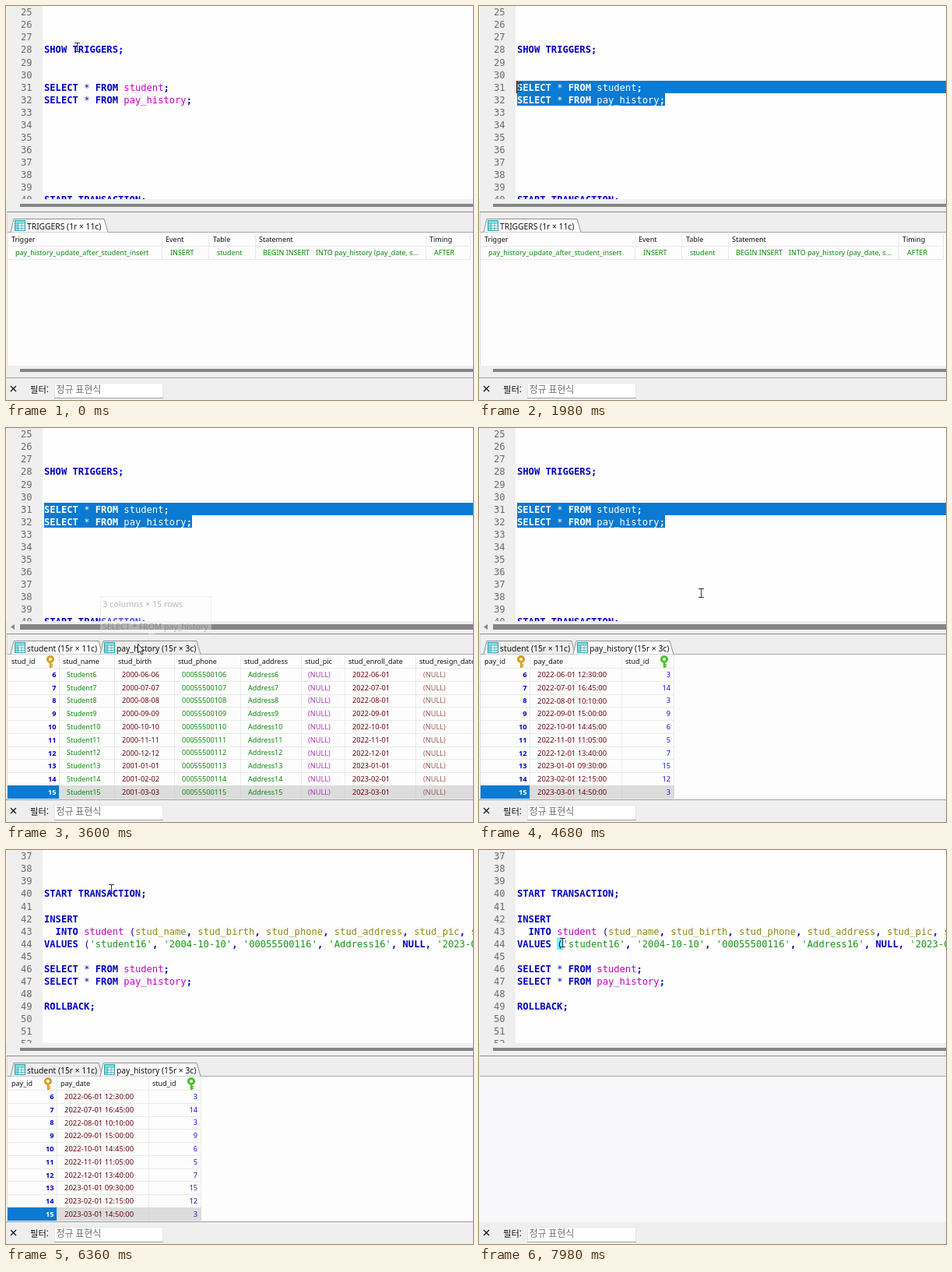
An HTML page with a canvas that plays this animation: 600x506 px, repeating every 8000 ms.

```html
<!DOCTYPE html>
<html lang="ko">
<head>
<meta charset="utf-8">
<style>
  html, body { margin: 0; width: 100%; height: 100%; overflow: hidden; background: #fff; }
  canvas { display: block; }
</style>
</head>
<body>
<canvas id="stage" width="600" height="506"></canvas>
<script>
const ctx = document.getElementById('stage').getContext('2d');
const LOOP = 8000;
const MONO = '"DejaVu Sans Mono", "Noto Sans Mono", monospace';
const SANS = '"Noto Sans", "Open Sans", sans-serif';
const KOREAN = '"Noto Sans CJK KR", "Noto Sans CJK", "Noto Sans", sans-serif';
const CODE_X = 49, CHAR_W = 7.31, CODE_SIZE = 12.14, LINE_H = 16.04, EDITOR_H = 248;
const ROW_H = 16.77, ROW_TOP = 308, VISIBLE_ROWS = 10;
const GREEN = '#0a8a0a', MAROON = '#6c0010', BLUE = '#0000c8', SELECT = '#0a7ad2', GRID = '#eaeaea';

const CODE = {
  28: 'SHOW TRIGGERS;',
  31: 'SELECT * FROM student;',
  32: 'SELECT * FROM pay_history;',
  40: 'START TRANSACTION;',
  42: 'INSERT',
  43: '  INTO student (stud_name, stud_birth, stud_phone, stud_address, stud_pic, stud_enroll_date',
  44: "VALUES ('student16', '2004-10-10', '00055500116', 'Address16', NULL, '2023-04-01'",
  46: 'SELECT * FROM student;',
  47: 'SELECT * FROM pay_history;',
  49: 'ROLLBACK;'
};

// Moments of the interaction, in ms
const AT = {
  dragStart: 1100, dragEnd: 1600, results: 2280, rowsDown: 2520, pickStudent: 3120,
  barHover: 3330, tip: 3530, payTab: 3780, payDown: 3960, pickPay: 4290,
  codeScroll: 5280, barLeave: 5640, deselect: 6030, cleared: 6540, bracket: 7800
};

const POINTER = [
  [0, 91, 53], [200, 91, 53], [900, 243, 121], [1100, 243, 121], [1600, 51, 104],
  [2150, 51, 104], [2550, 50, 419], [2860, 50, 419], [3060, 45, 465], [3200, 45, 465],
  [3500, 169, 277], [3800, 169, 277], [4100, 45, 465], [4310, 45, 465], [4620, 285, 212],
  [5700, 285, 212], [6000, 135, 50], [6700, 135, 50], [7700, 107, 119], [LOOP, 107, 119]
];

const pad = n => String(n).padStart(2, '0');

function studentRow(n) {
  const year = n > 12 ? 2001 : 2000;
  const month = (n - 1) % 12 + 1;
  return [n, 'Student' + n, `${year}-${pad(month)}-${pad(month)}`, '000555001' + pad(n), 'Address' + n,
    '(NULL)', `${2022 + (n > 12)}-${pad(month)}-01`, '(NULL)'];
}

const PAY_TIMES = ('10:00 11:30 09:15 14:20 13:10 12:30 16:45 10:10 15:00 14:45 ' +
  '11:05 13:40 09:30 12:15 14:50').split(' ');
const PAY_STUDENTS = [1, 2, 4, 8, 10, 3, 14, 3, 9, 6, 5, 7, 15, 12, 3];

function payRow(n) {
  const month = (n - 1) % 12 + 1;
  return [n, `${2022 + (n > 12)}-${pad(month)}-01 ${PAY_TIMES[n - 1]}:00`, PAY_STUDENTS[n - 1]];
}

// Column: name, header x, value x, right border, colour, font size, right aligned
const col = (name, head, x, edge, color, size = 9, right = false) => ({ name, head, x, edge, color, size, right });
const TABLES = {
  triggers: {
    cols: [col('Trigger', 7, 12, 200, GREEN), col('Event', 205, 211, 260, GREEN), col('Table', 266, 271, 320, GREEN),
      col('Statement', 325, 330, 539, GREEN), col('Timing', 544, 550, 596, GREEN)],
    width: 597, keys: []
  },
  student: {
    cols: [col('stud_id', 7, 64.5, 68, BLUE, 9.2, true), col('stud_name', 73, 78, 139, GREEN),
      col('stud_birth', 144, 149, 216, MAROON, 9.2), col('stud_phone', 221, 226, 301, GREEN, 9.1),
      col('stud_address', 306, 311, 379, GREEN), col('stud_pic', 384, 388, 435, '#a83cb4', 9.2),
      col('stud_enroll_date', 440, 445, 526, MAROON, 9.2), col('stud_resign_date', 531, 536, 620, '#a05a5a', 9.2)],
    width: 600, keys: [[57, '#d9a02c']], row: studentRow
  },
  pay: {
    cols: [col('pay_id', 7, 61.5, 65, BLUE, 9.2, true), col('pay_date', 70, 75, 183, MAROON, 9.45),
      col('stud_id', 188, 246, 250, '#1414d8', 9.2, true)],
    width: 250, keys: [[54, '#d9a02c'], [238, '#4cc02c']], row: payRow
  }
};

function rect(x, y, w, h, color) {
  ctx.fillStyle = color;
  ctx.fillRect(x, y, w, h);
}

// Text centred on y by its cap height
function text(str, x, y, color, size, { font = SANS, bold = false, align = 'left' } = {}) {
  ctx.font = `${bold ? 'bold ' : ''}${size}px ${font}`;
  ctx.fillStyle = color;
  ctx.textAlign = align;
  ctx.fillText(str, x, y + size * 0.36);
}

function path(points, fill, stroke, close = true) {
  ctx.beginPath();
  points.forEach(([x, y]) => ctx.lineTo(x, y));
  if (close) ctx.closePath();
  if (fill) { ctx.fillStyle = fill; ctx.fill(); }
  if (stroke) { ctx.strokeStyle = stroke; ctx.lineWidth = 1; ctx.stroke(); }
}

function pointerAt(t) {
  const i = POINTER.findIndex(p => p[0] > t);
  const [t0, x0, y0] = POINTER[i - 1], [t1, x1, y1] = POINTER[i];
  const k = (t - t0) / (t1 - t0), e = k * k * (3 - 2 * k);
  return { x: x0 + (x1 - x0) * e, y: y0 + (y1 - y0) * e };
}

// Number of units passed since start, one per step
const steps = (t, start, step, max) => Math.max(0, Math.min(max, Math.floor((t - start) / step) + 1));

function tokenStyle(token, inColumns) {
  if (token[0] === "'") return ['#169616', false];
  if (/^[A-Z]/.test(token)) return [BLUE, true];
  if (/^[a-z]/.test(token)) return [inColumns ? '#8c8c0c' : '#c400c4', false];
  return [BLUE, token === ';' || token === ','];
}

function drawCodeLine(str, y, white) {
  let inColumns = false;
  for (const m of str.matchAll(/'[^']*'|\w+|[^\s\w]/g)) {
    if (m[0] === '(') inColumns = true;
    const [color, bold] = tokenStyle(m[0], inColumns);
    text(m[0], CODE_X + m.index * CHAR_W, y, white ? '#fff' : color, CODE_SIZE, { font: MONO, bold });
  }
}

function selectionStart(t) {
  if (t < AT.dragStart || t >= AT.deselect) return null;
  const p = pointerAt(Math.min(t, AT.dragEnd));
  const line = p.y < 112 ? 31 : 32;
  const c = Math.round((p.x - CODE_X) / CHAR_W);
  return { line, col: Math.max(0, Math.min(CODE[line].length, c)) };
}

function drawEditor(t) {
  const first = 25 + 3 * steps(t, AT.codeScroll, 120, 4);
  const sel = selectionStart(t);
  ctx.save();
  ctx.beginPath();
  ctx.rect(0, 0, 600, EDITOR_H);
  ctx.clip();
  rect(0, 0, 600, EDITOR_H, '#fefefe');
  rect(1, 0, 46, EDITOR_H, '#efefef');
  for (let n = first; n < first + 16; n++) {
    const y = 8 + (n - first) * LINE_H;
    const code = CODE[n] || '';
    text(n, 33.6, y, '#6c6c6c', CODE_SIZE, { font: MONO, align: 'right' });
    if (n === 44 && t >= AT.bracket) rect(100, y - 8, 8.5, 16, '#7cf4f4');
    drawCodeLine(code, y, false);
    if (sel && n >= sel.line && n <= 32) {
      const x = CODE_X + (n === sel.line ? sel.col : 0) * CHAR_W;
      const end = n === 32 ? CODE_X + code.length * CHAR_W : 600;
      ctx.save();
      ctx.beginPath();
      ctx.rect(x, Math.round(y - 8), end - x, 16);
      ctx.clip();
      rect(x, y - 9, end - x, 18, SELECT);
      drawCodeLine(code, y, true);
      ctx.restore();
      const caretOn = t < AT.pickStudent && Math.floor((t - AT.dragEnd) / 530) % 2 === 0;
      if (n === sel.line && caretOn) rect(Math.floor(x) - 1, Math.round(y - 8), 1, 16, '#111');
    }
  }
  ctx.restore();

  rect(0, 248, 600, 16, '#efefef');
  const hover = t >= AT.barHover && t < AT.barLeave;
  if (hover) path([[6, 255.5], [11, 252], [11, 259]], '#858585');
  rect(18, hover ? 252 : 254, 582, hover ? 7 : 4, '#858585');
}

function tableIcon(x, y) {
  rect(x, y, 14, 14, '#2f9fae');
  rect(x + 1, y + 1, 12, 3, '#7fdde0');
  for (let r = 0; r < 3; r++)
    for (let c = 0; c < 3; c++)
      rect(x + 1 + c * 4.2, y + 4.5 + r * 3.1, 3.5, 2.4, c ? '#f2ffff' : '#8fe0e4');
}

function drawTab(x, right, label, active) {
  path([[x, 290.5], [x + 4, 273.5], [right - 5, 273.5], [right, 290.5]], active ? '#fdfdfd' : '#efefef', '#909090', false);
  tableIcon(x + 5, 275);
  text(label, x + 21, 283, '#111', 10.3);
}

function drawKey(x, color) {
  ctx.strokeStyle = color;
  ctx.lineWidth = 3;
  ctx.beginPath();
  ctx.arc(x, 297, 3.6, 0, 7);
  ctx.stroke();
  rect(x - 1.2, 300, 2.6, 8, color);
  rect(x + 1, 303, 2.2, 1.5, color);
  rect(x + 1, 305.5, 2.2, 1.5, color);
}

function drawHeader({ cols, width, keys }) {
  for (const c of cols) {
    text(c.name, c.head, 299.5, '#111', 9);
    rect(c.edge, 292, 1, 16, GRID);
  }
  rect(2, 308, width - 2, 1, GRID);
  keys.forEach(([x, color]) => drawKey(x, color));
}

function drawRows(table, firstRow, picked) {
  const { cols, width, row } = table;
  for (let i = 0; i < VISIBLE_ROWS; i++) {
    const n = firstRow + i, y = ROW_TOP + i * ROW_H;
    const top = Math.round(y), bottom = Math.round(y + ROW_H);
    const isPicked = n === picked;
    if (isPicked) {
      rect(2, top, width - 2, bottom - top, '#dcdcdc');
      rect(2, top, cols[0].edge - 2, bottom - top, SELECT);
    }
    rect(2, bottom, width - 2, 1, GRID);
    row(n).forEach((value, k) => {
      const c = cols[k];
      rect(c.edge, top, 1, bottom - top, isPicked ? '#d4d4d4' : GRID);
      text(value, c.x, y + 8.6, isPicked && !k ? '#fff' : c.color, c.size,
        { bold: k === 0, align: c.right ? 'right' : 'left' });
    });
  }
}

function drawTriggers() {
  const { cols } = TABLES.triggers;
  const values = ['pay_history_update_after_student_insert', 'INSERT', 'student', 'BEGIN INSERT', 'AFTER'];
  values.forEach((v, k) => {
    rect(cols[k].edge, ROW_TOP, 1, 17, GRID);
    text(v, cols[k].x, 317, GREEN, 9);
  });
  text('INTO pay_history (pay_date, s...', 398, 317, GREEN, 9);
  rect(2, 325, 595, 1, GRID);
  rect(0, 462, 600, 15, '#efefef');
  rect(18, 466, 582, 4, '#858585');
}

function drawResults(t) {
  const cleared = t >= AT.cleared;
  rect(0, 264, 600, 27, '#eeeeee');
  rect(1, 264, 599, 1, '#8e8e8e');
  rect(0, 291, 600, 187, cleared ? '#f8f7fa' : '#fdfdfd');
  rect(1, 290, 599, 1, '#a8a8a8');
  if (cleared) return;

  rect(1, 265, 1, 212, '#dcdcdc');
  if (t < AT.results) {
    drawTab(6, 131, 'TRIGGERS (1r × 11c)', true);
    drawHeader(TABLES.triggers);
    drawTriggers();
  } else {
    const onPay = t >= AT.payTab;
    drawTab(6, 124, 'student (15r × 11c)', !onPay);
    drawTab(121, 250, 'pay_history (15r × 3c)', onPay);
    const table = onPay ? TABLES.pay : TABLES.student;
    const scroll = Math.min(5, 3 * steps(t, onPay ? AT.payDown : AT.rowsDown, 120, 2));
    const picked = t >= (onPay ? AT.pickPay : AT.pickStudent) ? 15 : 0;
    drawHeader(table);
    drawRows(table, 1 + scroll, picked);
  }
  rect(0, 477, 600, 1, '#a0a0a0');
}

function drawFilter() {
  rect(0, 478, 600, 28, '#efefef');
  ctx.strokeStyle = '#111';
  ctx.lineWidth = 1.2;
  ctx.beginPath();
  ctx.moveTo(6, 488); ctx.lineTo(13, 495);
  ctx.moveTo(13, 488); ctx.lineTo(6, 495);
  ctx.stroke();
  text('필터:', 31, 493, '#111', 11.3, { font: KOREAN });
  rect(62, 484, 140, 20, '#e6e6e6');
  rect(63, 485, 138, 18, '#fff');
  rect(62, 503, 140, 1, '#a0a0a0');
  text('정규 표현식', 64.5, 493, '#707070', 12, { font: KOREAN });
}

function drawTip(t) {
  if (t < AT.tip || t >= AT.payTab) return;
  ctx.globalAlpha = Math.min(1, (t - AT.tip) / 200);
  path([[121.5, 216.5], [263.5, 216.5], [263.5, 262.5], [193, 262.5], [183, 273], [183, 262.5], [121.5, 262.5]],
    '#f8f8f8', '#d4d4d4');
  text('3 columns × 15 rows', 124, 226, '#444', 10.8);
  text('SELECT * FROM pay_history', 124, 255, '#444', 10.5);
  ctx.globalAlpha = 1;
}

function drawPointer(t) {
  const { x, y } = pointerAt(t);
  ctx.save();
  ctx.translate(Math.round(x), Math.round(y));
  if (y < EDITOR_H && x > 48) {
    rect(0, -6, 1, 12, '#333');
    for (const side of [-6, 5]) {
      rect(-3, side, 3, 1, '#333');
      rect(1, side, 3, 1, '#333');
    }
  } else {
    path([[0.5, 0.5], [0.5, 12], [3, 9.5], [5, 14], [7, 13], [5, 9], [8.5, 9]], '#fff', '#222');
  }
  ctx.restore();
}

function frame() {
  const t = performance.now() % LOOP;
  drawEditor(t);
  drawResults(t);
  drawFilter();
  drawTip(t);
  drawPointer(t);
  requestAnimationFrame(frame);
}
frame();
</script>
</body>
</html>
```
